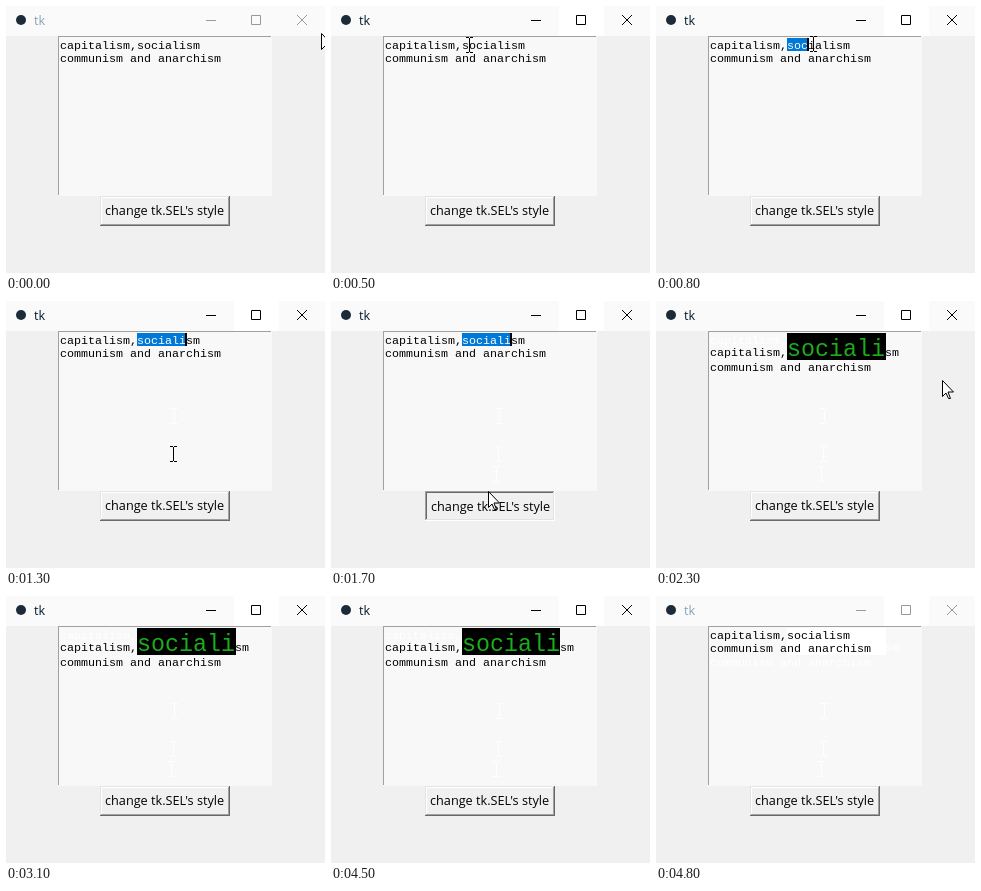
Recreate the animation shown at these times as an HTML page with a canvas. Size 319 px wide and 267 px high, loop 4900 ms.

```html
<!DOCTYPE html>
<html lang="en">
<head>
<meta charset="utf-8">
<title>tk</title>
<style>
html, body { margin: 0; width: 100%; height: 100%; overflow: hidden; background: #f0f0f0; }
canvas { display: block; }
</style>
</head>
<body>
<canvas id="stage" width="319" height="267"></canvas>
<script>
const ctx = document.getElementById('stage').getContext('2d');
const LOOP = 4900, LEFT = 54, CHAR = 7, SEL_X = LEFT + 11 * CHAR;
const MONO = '"Liberation Mono", monospace';
const SMALL = `11.667px ${MONO}`, BIG = `23.333px ${MONO}`;
const UI = '12.7px "Open Sans", sans-serif';
const LINE1 = 'capitalism,socialism', LINE2 = 'communism and anarchism';

// [start ms, kind, x, y]
const pointer = [
  [0, 'arrow', 315, 27], [100, 'arrow', 296, 30], [200, 'beam', 258, 34],
  [300, 'beam', 212, 37], [400, 'beam', 168, 39], [500, 'beam', 138, 39],
  [600, 'beam', 133, 38], [700, 'beam', 143, 38], [800, 'beam', 157, 38],
  [900, 'beam', 166, 38], [1000, 'beam', 174, 38], [1100, 'beam', 178, 39],
  [1200, 'beam', 168, 115], [1300, 'beam', 167, 153], [1400, 'beam', 165, 173],
  [1500, 'arrow', 158, 196], [1600, 'arrow', 157, 190], [2200, 'arrow', 236, 124],
  [2300, 'arrow', 286, 79], [2400, 'arrow', 310, 58], [2500, 'none', 0, 0]
];
const trails = [[1300, 168, 115], [1400, 167, 153], [1500, 165, 173]];
const selected = [[0, 0], [700, 1], [800, 3], [900, 4], [1000, 5], [1100, 7]];
const bigCaret = [[1800, true], [2000, false], [2200, true], [2800, false],
  [3100, true], [3700, false], [3900, true], [4500, false]];

const at = (track, t) => track.filter(k => k[0] <= t).pop();

function box(x, y, w, h, color) {
  ctx.fillStyle = color;
  ctx.fillRect(x, y, w, h);
}

function bevel(x, y, w, h, light, dark) {
  box(x, y, w, h, dark);
  box(x, y, w - 1, h - 1, light);
}

function text(str, x, y, font, color) {
  ctx.font = font;
  ctx.fillStyle = color;
  ctx.fillText(str, x, y);
}

function path(d, stroke, fill) {
  const p = new Path2D(d);
  if (fill) { ctx.fillStyle = fill; ctx.fill(p); }
  ctx.strokeStyle = stroke;
  ctx.lineWidth = 1;
  ctx.stroke(p);
}

function drawTitle(t) {
  const active = t >= 500 && t < 4800;
  const ink = active ? '#000' : '#999';
  box(0, 0, 319, 30, '#fafafa');
  if (t >= 500) box(228, 0, 45, 30, '#fff');
  ctx.fillStyle = '#1b2b3a';
  ctx.beginPath();
  ctx.arc(15, 14, 5, 0, 7);
  ctx.fill();
  text('tk', 28, 19, UI, active ? '#001a2b' : '#85a4b5');
  path('M200 14.5h10M245.5 9.5h9v9h-9z', ink);
  path('M291 9l10 10M301 9l-10 10', ink);
}

function drawButton(down) {
  const shift = down ? 1 : 0;
  const [outer, inner] = down
    ? [['#a0a0a0', '#fff'], ['#696969', '#e3e3e3']]
    : [['#e3e3e3', '#696969'], ['#fff', '#a0a0a0']];
  bevel(94, 190, 130, 30, ...outer);
  bevel(95, 191, 128, 28, ...inner);
  box(96, 192, 126, 26, '#f0f0f0');
  text("change tk.SEL's style", 99 + shift, 209 + shift, UI, '#000');
}

function drawBeam(x, y, color) {
  path(`M${x - 3} ${y - 7.5}h3M${x + 1} ${y - 7.5}h3M${x + .5} ${y - 7}v14` +
    `M${x - 3} ${y + 7.5}h3M${x + 1} ${y + 7.5}h3`, color);
}

function drawCaret(x, height) {
  box(x - 1, 32, 2, height, '#000');
}

function drawPlain(t) {
  const count = at(selected, t)[1];
  text(LINE1, LEFT, 43, SMALL, '#000');
  text(LINE2, LEFT, 56, SMALL, '#000');
  if (t < 600 || t >= 4800) return;
  box(SEL_X, 32, count * CHAR, 13, '#0078d7');
  text(LINE1.slice(11, 11 + count), SEL_X, 43, SMALL, '#fff');
  drawCaret(SEL_X + count * CHAR, 13);
}

function drawStyled(t) {
  text(LINE1, LEFT, 43, SMALL, '#fff');
  text('capitalism,', LEFT, 55, SMALL, '#000');
  text('sm', SEL_X + 98, 55, SMALL, '#000');
  text(LINE2, LEFT, 70, SMALL, '#000');
  box(SEL_X, 32, 98, 27, '#000');
  text('sociali', SEL_X, 55, BIG, '#1aae1a');
  if (at(bigCaret, t)[1]) drawCaret(SEL_X + 98, 27);
}

function drawEditor(t) {
  bevel(52, 30, 214, 160, '#a0a0a0', '#f8f8f8');
  box(53, 31, 213, 158, '#f8f8f8');
  for (const [start, x, y] of trails) if (t >= start) drawBeam(x, y, '#fff');
  if (t >= 4800) {
    // light residue of the styled text
    box(SEL_X, 32, 99, 27, '#fff');
    text('sm', SEL_X + 98, 55, SMALL, '#fff');
    text(LINE2, LEFT, 70, SMALL, '#fff');
  }
  if (t >= 1800 && t < 4800) drawStyled(t);
  else drawPlain(t);
}

function drawPointer(t) {
  const [, kind, x, y] = at(pointer, t);
  if (kind === 'beam') drawBeam(x, y, '#000');
  if (kind === 'arrow') {
    path(`M${x + .5} ${y + .5}v16l3.5 -3.5 2.5 5.5h2l-2.5 -6.5h5.5z`, '#000', '#fff');
  }
}

const start = performance.now();

function render() {
  const t = Math.max(0, performance.now() - start) % LOOP;
  box(0, 0, 319, 267, '#f0f0f0');
  drawTitle(t);
  drawEditor(t);
  drawButton(t >= 1700 && t < 1800);
  drawPointer(t);
  requestAnimationFrame(render);
}
render();
</script>
</body>
</html>
```
